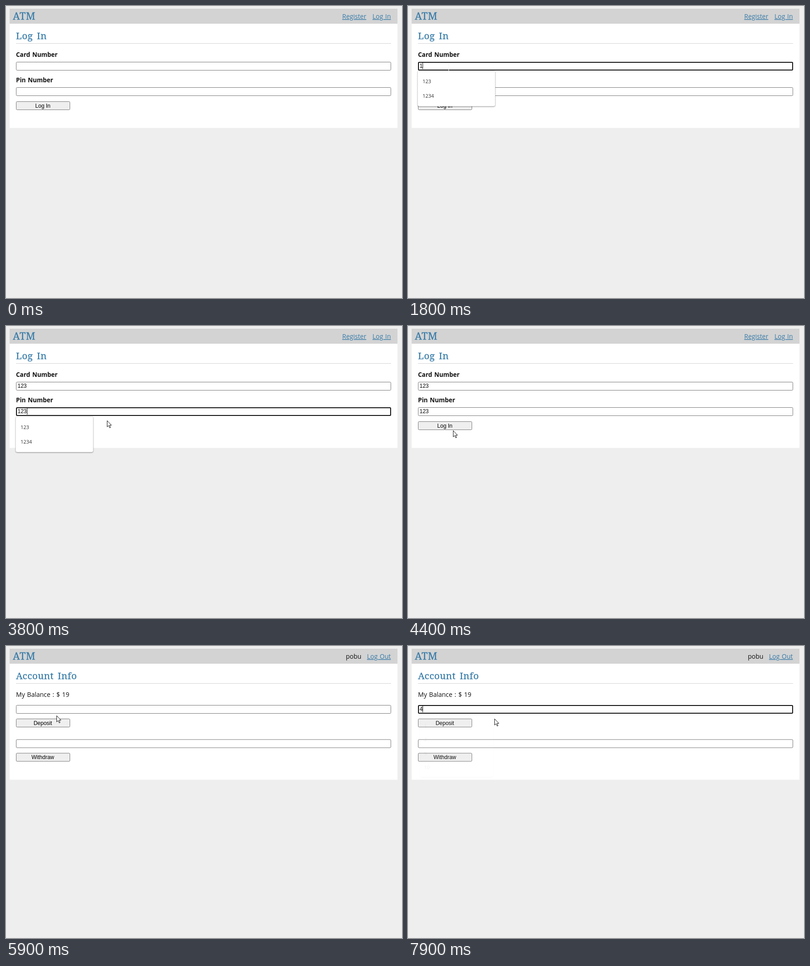
Write an HTML page that moves like this. It is 871x643 px and loops after 8 s.

```html
<!DOCTYPE html>
<html lang="en">
<head>
<meta charset="utf-8">
<title>ATM</title>
<style>
  html, body { margin: 0; width: 100%; height: 100%; overflow: hidden; background: #eee; }
  svg { display: block; }
  text { font: 14px "Open Sans", "Noto Sans", sans-serif; fill: #111; white-space: pre; word-spacing: 1px; }
  .title { font: 20.5px "Noto Serif", serif; fill: #377ba8; stroke: #377ba8; stroke-width: .3px;
    letter-spacing: .5px; word-spacing: 3px; }
  .link { fill: #377ba8; text-decoration: underline; }
  .label { font-weight: 700; font-size: 13.5px; }
  .form { font: 12px "Liberation Sans", Arial, sans-serif; fill: #000; word-spacing: 0; }
  .option { font-size: 11px; fill: #333; }
  .popup > rect { fill: #fff; stroke: #e6e6e6; filter: drop-shadow(0 1px 1px #0006); }
</style>
</head>
<body>
<svg id="stage" width="871" height="643" viewBox="0 0 871 643"></svg>
<script>
const LOOP = 8000, STEP = 100;
const stage = document.getElementById('stage');

// pointer keys: time, x, y
const path = [
  [400, 11, 3], [500, 52, 70], [600, 83, 134], [700, 83, 134], [800, 89, 134],
  [2100, 89, 134], [2200, 158, 152], [2300, 158, 152], [2600, 231, 186],
  [3500, 231, 186], [3600, 228, 190], [4000, 215, 225], [4400, 99, 230],
  [4500, 99, 230], [4700, 100, 224], [5600, 100, 224], [6100, 118, 106],
  [6200, 118, 106], [6300, 121, 101], [6500, 129, 156], [6700, 125, 142],
  [7700, 125, 142], [7800, 190, 160], [LOOP, 190, 160]
];

const within = (t, a, b) => t >= a && t < b;
const rect = (x, y, w, h, attrs) =>
  `<rect x="${x}" y="${y}" width="${w}" height="${h}" ${attrs}/>`;
const text = (x, y, str, cls = '', attrs = '') =>
  `<text x="${x}" y="${y}" class="${cls}" ${attrs}>${str}</text>`;

function pointerAt(t) {
  if (t < 400 || within(t, 2000, 2200) || within(t, 3200, 3600)) return null;
  const i = path.findIndex(k => k[0] > t);
  const [t0, x0, y0] = path[i - 1], [t1, x1, y1] = path[i];
  const p = (t - t0) / (t1 - t0);
  return { x: Math.round(x0 + (x1 - x0) * p), y: Math.round(y0 + (y1 - y0) * p) };
}

const over = (p, y, w) => p && p.x >= 22 && p.x < 22 + w && p.y >= y && p.y < y + 18;

function pointer(p, fields) {
  if (!p) return '';
  if (fields.some(y => over(p, y, 825))) return rect(p.x, p.y - 7, 1, 15, 'fill="#f6f6f6"');
  return `<path transform="translate(${p.x + .5} ${p.y + .5})" fill="#fff" stroke="#111"
    d="M0 0V13.6L3.2 10.7L5.5 15.8L7.5 14.9L5.3 9.9H9.4Z"/>`;
}

function field(y, p, value = '', focus = false, caret = focus) {
  const edge = over(p, y, 825) ? '#444' : '#767676';
  const box = focus
    ? rect(23, y + 1, 823, 17, 'rx="1.5" fill="#fff" stroke="#101010" stroke-width="2"')
    : rect(22.5, y + .5, 824, 18, `rx="2" fill="#fff" stroke="${edge}"`);
  const caretX = Math.floor(26 + value.length * 6.67);
  return box + text(25.5, y + 13.3, value, 'form') +
    (caret ? rect(caretX, y + 2, 1, 14, 'fill="#000"') : '');
}

function button(y, p, label) {
  const hot = over(p, y, 118);
  return rect(22.5, y + .5, 118, 18, `rx="2" fill="${hot ? '#e5e5e5' : '#efefef'}" stroke="${hot ? '#4f4f4f' : '#767676'}"`) +
    text(81, y + 13.5, label, 'form', 'text-anchor="middle"');
}

// suggestion list; shrinks about its centre as it fades
function popup(y, items, alpha = 1) {
  const h = items.length * 32 + 15, cx = 106.5, cy = y + h / 2;
  return `<g class="popup" opacity="${alpha}" transform="translate(${cx} ${cy})
    scale(${.95 + .05 * alpha}) translate(${-cx} ${-cy})">` +
    rect(21.5, y + .5, 170, h - 1, 'rx="3"') +
    items.map((s, i) => text(32, y + 28 + i * 32, s, 'option')).join('') + '</g>';
}

const page = (title, bottom) =>
  rect(8, 6, 853, 33, 'fill="#d3d3d3"') +
  rect(8, 39, 853, bottom - 39, 'fill="#fff"') +
  rect(22, 82, 825, 1, 'fill="#d3d3d3"') +
  text(15, 30, 'ATM', 'title', 'style="font-size:22px"') +
  text(22, 73, title, 'title');

function login(t, p) {
  const card = '123'.slice(0, t < 1800 ? 0 : t < 2000 ? 1 : t < 2200 ? 2 : 3);
  const pin = '123'.slice(0, Math.max(0, (t - 3100) / 100));
  const cardFocus = within(t, 1100, 2700), pinFocus = within(t, 2700, 4000);
  const matches = ['123', '1234'];
  let s = page('Log In', 268.5) +
    text(739.5, 28, 'Register', 'link') + text(806, 28, 'Log In', 'link') +
    text(22, 112, 'Card Number', 'label') +
    field(123, p, card, cardFocus, cardFocus && !within(t, 1600, 1800)) +
    text(22, 168, 'Pin Number', 'label') +
    field(179, p, pin, pinFocus) +
    button(210, p, 'Log In');
  if (within(t, 1100, 1800)) s += popup(142, [...matches, '456']);
  if (within(t, 1800, 2900)) s += popup(142, matches, t < 2700 ? 1 : t < 2800 ? .7 : .35);
  if (within(t, 2700, 4200)) s += popup(199, matches, t < 4000 ? 1 : t < 4100 ? .5 : .1);
  return s + pointer(p, [123, 179]);
}

function account(t, p) {
  let s = page('Account Info', 294.5) +
    text(747.5, 28, 'pobu') + text(794, 28, 'Log Out', 'link') +
    text(22, 112, 'My Balance : $ 19') +
    field(130, p, t < 7800 ? '' : '4', t >= 7200) +
    button(160, p, 'Deposit') +
    field(205.5, p) +
    button(235.5, p, 'Withdraw');
  if (t >= 7300) s += popup(149, ['1', '2', '5', '10'], t < 7800 ? 1 : t < 7900 ? .5 : .05);
  return s + pointer(p, [130, 205.5]);
}

let shown = -1;
function draw(now) {
  const t = Math.floor(now % LOOP / STEP) * STEP;
  if (t !== shown) {
    shown = t;
    stage.innerHTML = (t < 5100 ? login : account)(t, pointerAt(t));
  }
  requestAnimationFrame(draw);
}
draw(0);
</script>
</body>
</html>
```
